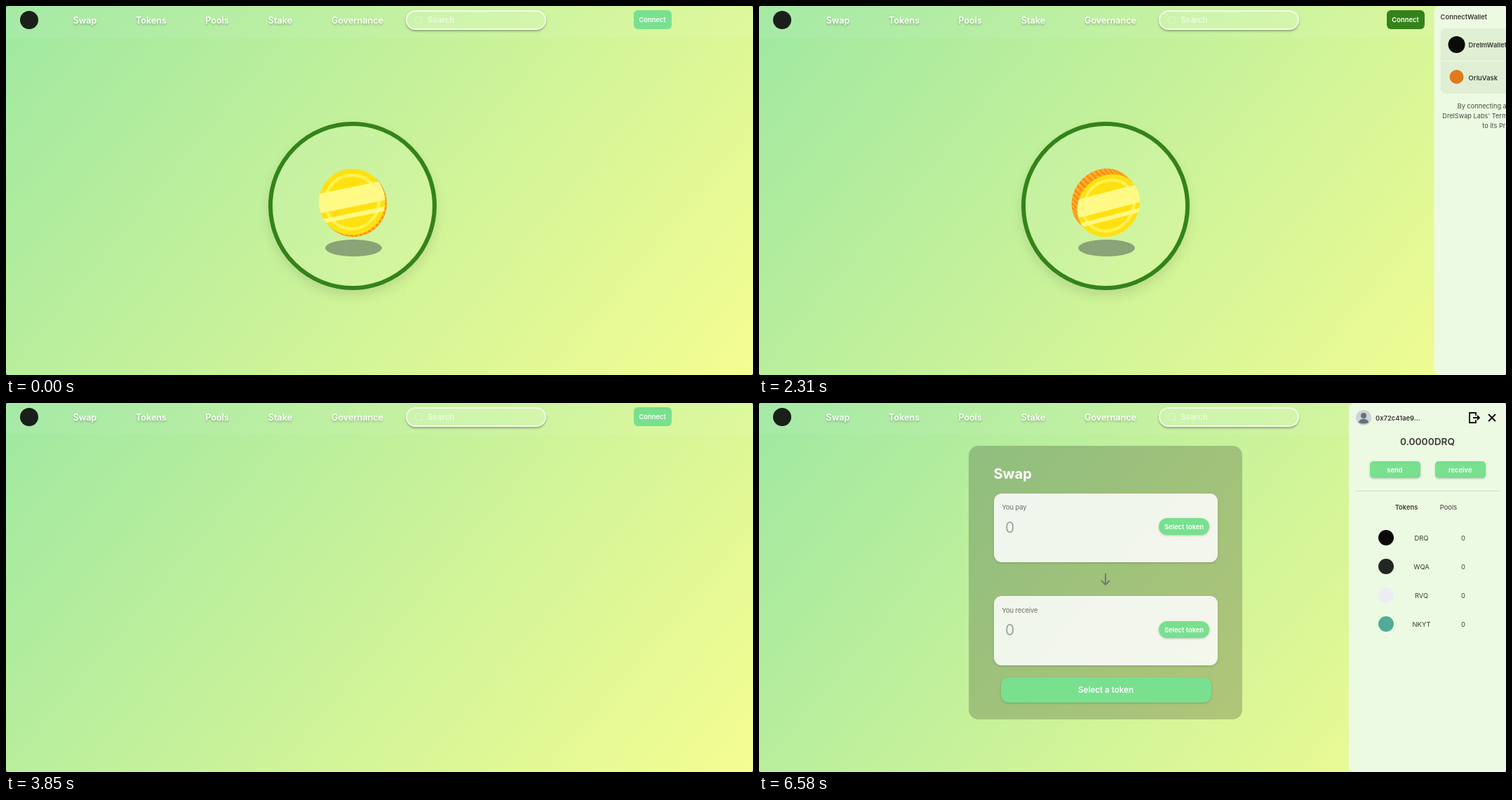
Write an HTML page with a canvas that moves like this. It is 1065x526 px and loops after 8 s.

```html
<!DOCTYPE html>
<html lang="en">
<head>
<meta charset="utf-8">
<title>Token swap</title>
<style>
  html, body { margin: 0; width: 100%; height: 100%; overflow: hidden; background: #5b6350; }
  #stage {
    position: relative; width: 1065px; height: 526px; overflow: hidden; border-radius: 3px;
    background: linear-gradient(130deg, #9fe8a1, #f5fd92);
    font-family: Inter, sans-serif;
  }
  #stage div, #stage span, #stage svg, canvas { position: absolute; box-sizing: border-box; }
  .layer { inset: 0; }
  span { white-space: pre; transform: translateY(-50%); color: #383b36; font-size: 9.4px; }
  span.mid { transform: translate(-50%, -50%); }
  .bold { font-weight: 600; }
  .white { color: #fff; }
  .nav { color: #fff; font-weight: 600; font-size: 12.6px; text-shadow: 0 2px 3px rgba(0,0,0,.25); }
  .terms { font-size: 9.2px; color: #474a44; }
  .green { background: #78e08f; }
  .hover { background: #34831a; }
  .raised { box-shadow: 0 1px 3px rgba(0,0,0,.2); }
  .panel { left: 841px; top: 0; width: 224px; height: 526px; background: #edfae3; border-radius: 8px 0 0 8px; }
  .row { background: #e0efd4; }
  .row.over { background: #d8e5c8; }
  #search { border: 2px solid #f4fce9; background: rgba(255,255,255,.12); box-shadow: 0 2px 3px rgba(0,0,0,.3); }
  #ring { border: 6px solid #34831a; background: rgba(255,255,255,.06); box-shadow: 0 8px 16px rgba(0,0,0,.1); }
</style>
</head>
<body>
<div id="stage"></div>
<script>
const LOOP = 8000, STEP = 70, SLIDE = 350, PANEL_W = 224;
const ACCOUNT = '0x72c41ae9...';

const box = (x, y, w, h, radius, cls = '', css = '', id = '') =>
  `<div id="${id}" class="${cls}" style="left:${x}px;top:${y}px;width:${w}px;height:${h}px;border-radius:${radius}px;${css}"></div>`;
const disc = (cx, cy, r, color) => box(cx - r, cy - r, 2 * r, 2 * r, r, '', `background:${color}`);
const label = (x, y, text, cls = '', css = '') =>
  `<span class="${cls}" style="left:${x}px;top:${y}px;${css}">${text}</span>`;
const button = (x, y, w, h, radius, text, cls = '', css = '', id = '') =>
  box(x, y, w, h, radius, 'green ' + cls, '', id) + label(x + w / 2, y + h / 2, text, 'mid bold white', css);
const icon = (x, y, w, h, viewBox, body) =>
  `<svg style="left:${x}px;top:${y}px" width="${w}" height="${h}" viewBox="${viewBox}" fill="none">${body}</svg>`;
const layer = (id, html, cls = 'layer') => `<div id="${id}" class="${cls}">${html}</div>`;

const avatar = (cx, cy, r) => icon(cx - r, cy - r, 2 * r, 2 * r, '-11 -11 22 22',
  `<circle r="11" fill="#cbd4d8"/><g fill="#63737c"><circle cy="-3" r="4"/>
   <path d="M-7 7C-7 0 7 0 7 7Q0 10-7 7"/></g>`);
const logout = (cx, cy) => icon(cx - 8, cy - 8, 16, 16, '-8 -8 16 16',
  `<path d="M2-3V-7H-7V7H2V3M-2 0H7M4-3L7 0L4 3" stroke="#111" stroke-width="1.8"/>`);
const cross = (cx, cy, r, width) => icon(cx - 8, cy - 8, 16, 16, '-8 -8 16 16',
  `<path d="M${-r} ${-r}L${r} ${r}M${r} ${-r}L${-r} ${r}" stroke="#111" stroke-width="${width}"/>`);

const header = box(0, 0, 1065, 45, 0, '', 'background:rgba(255,255,255,.06)') +
  disc(33, 20, 13, '#1b1f19') +
  [['Swap', 112.5], ['Tokens', 207], ['Pools', 301], ['Stake', 391], ['Governance', 501]]
    .map(([name, x]) => label(x, 20, name, 'mid nav')).join('') +
  box(570, 6, 199.5, 28, 14, '', '', 'search') +
  icon(581, 13, 14, 14, '-7 -7 14 14',
    '<path d="M5 0A5 5 0 1 1 5-.1M3.5 3.5L6 6" stroke="#fff" stroke-opacity=".45"/>') +
  label(601, 20, 'Search', 'bold', 'font-size:11.3px;color:rgba(255,255,255,.62)');

const loader = box(374, 165, 240, 240, 120, '', '', 'ring') +
  box(455, 333.3, 81, 24, '50', '', 'background:#8aa377;border-radius:50%') +
  '<canvas id="coin" width="120" height="120" style="left:434px;top:220px"></canvas>';

const amountBox = (y, title) =>
  box(334.5, y, 319, 98.5, 11, 'raised', 'background:rgba(255,255,255,.86)') +
  label(346.5, y + 19.5, title, '', 'font-size:9.2px;color:#666a63') +
  label(351, y + 48, '0', '', 'font-size:21px;color:#a0a39d') +
  button(570, y + 35.5, 72, 24, 12, 'Select token', 'raised');

const swapCard = box(299, 60.5, 390, 390.5, 14, '', 'background:rgba(0,0,0,.2)') +
  label(334.5, 101, 'Swap', 'white', 'font-size:20px;font-weight:700') +
  amountBox(128.5, 'You pay') +
  icon(486, 242, 16, 18, '-8 -9 16 18',
    '<path d="M0-8V7.5M-6 2L0 8L6 2" stroke="#747a6f" stroke-width="2"/>') +
  amountBox(275, 'You receive') +
  button(344.5, 390.5, 300, 36, 11, 'Select a token', 'raised', 'font-size:11.6px');

const walletPanel = label(9, 14.5, 'ConnectWallet', 'bold') +
  logout(186.5, 14.5) + cross(207.5, 14.5, 6.5, 2.4) +
  box(9, 32, 206, 45.5, '8px 8px 0 0', 'row', 'border-radius:8px 8px 0 0', 'firstWallet') +
  box(9, 79, 206, 45.5, 0, 'row', 'border-radius:0 0 8px 8px', 'secondWallet') +
  disc(32, 54.5, 12, '#0a0a08') + disc(32, 101, 10, '#e07a1e') +
  label(49, 55, 'DrelmWallet', 'bold') + label(49, 101.5, 'OrluVask', 'bold') +
  ['By connecting a wallet, you agree to', 'DrelSwap Labs\' Terms of Service and consent', 'to its Privacy Policy.']
    .map((line, i) => label(112, 141.5 + 14.3 * i, line, 'mid terms')).join('');

const holdings = [['DRQ', '#0a0a08'], ['WQA', '#242622'], ['RVQ', '#ecedf2'], ['NKYT', '#50ac97']];
const accountPanel = avatar(21, 21, 11) + label(38, 21, ACCOUNT, 'bold') +
  logout(178.5, 21) + cross(203.5, 21, 5, 2) +
  label(112, 55, '0.0000DRQ', 'mid bold', 'font-size:13.7px') +
  button(29.5, 82.5, 72, 24, 5, 'send', 'raised') +
  button(122.5, 82.5, 72.5, 24, 5, 'receive', 'raised') +
  box(10, 125, 205, 1, 0, '', 'background:#cbd8c3') +
  label(82, 148, 'Tokens', 'mid bold') + label(142, 148, 'Pools', 'mid') +
  holdings.map(([name, color], i) => {
    const y = 192 + 41 * i;
    return disc(52.5, y, 11, color) + label(103.5, y, name, 'mid') + label(163, y, '0', 'mid');
  }).join('');

document.getElementById('stage').innerHTML = header +
  layer('loader', loader) + layer('swap', swapCard) +
  layer('connect', button(894.5, 6, 54, 26.5, 6, 'Connect', '', '', 'connectButton')) +
  layer('account', box(853.5, 6, 103, 26.5, 6, 'green', '', 'accountButton') +
    avatar(868, 19.3, 7.7) + label(880, 19.5, ACCOUNT, 'bold white')) +
  layer('walletPanel', walletPanel, 'panel') + layer('accountPanel', accountPanel, 'panel');

const el = id => document.getElementById(id);
const show = (id, on) => { el(id).style.display = on ? '' : 'none'; };
const toggle = (id, cls, on) => el(id).classList.toggle(cls, on);
const ctx = el('coin').getContext('2d');

// A half turn looks the same as none, so the angle is folded into -90..90 degrees.
function coinAngle(t) {
  const p = t % 1050 / 1050, w = 2 * Math.PI * p;
  const deg = -8 + 180 * p + 4.7 * Math.sin(w) - 6.5 * (1 - Math.cos(w));
  return (deg > 90 ? deg - 180 : deg) * Math.PI / 180;
}

function drawCoin(angle) {
  const R = 47.5, squash = Math.cos(angle), shift = 12 * Math.sin(angle);
  const side = shift > 0 ? -1 : 1, stripes = 44;
  ctx.setTransform(1, 0, 0, 1, 0, 0);
  ctx.clearRect(0, 0, 120, 120);
  ctx.translate(60.5, 60.5);
  ctx.rotate(-Math.PI / 4);

  // Milled edge, seen on the side away from the face
  ctx.fillStyle = '#ff8a0c';
  ctx.beginPath();
  ctx.ellipse(0, -shift, R, R * squash, 0, 0, 7);
  ctx.fill();
  ctx.fillRect(-R, -Math.abs(shift), 2 * R, 2 * Math.abs(shift));
  const rim = i => {
    const a = Math.PI * i / stripes;
    return [R * Math.cos(a), side * R * squash * Math.sin(a)];
  };
  ctx.fillStyle = '#ffb331';
  for (let i = 0; i < stripes; i += 2) {
    const [x1, y1] = rim(i), [x2, y2] = rim(i + 1);
    ctx.beginPath();
    ctx.moveTo(x1, y1 - shift);
    ctx.lineTo(x2, y2 - shift);
    ctx.lineTo(x2, y2 + shift);
    ctx.lineTo(x1, y1 + shift);
    ctx.fill();
  }

  // Face with ring and two slanted highlights
  ctx.save();
  ctx.translate(0, shift);
  ctx.scale(1, squash);
  ctx.rotate(Math.PI / 4);
  ctx.beginPath();
  ctx.arc(0, 0, R, 0, 7);
  ctx.fillStyle = '#ffe112';
  ctx.fill();
  ctx.clip();
  ctx.beginPath();
  ctx.arc(0, 0, 38.5, 0, 7);
  ctx.lineWidth = 4.5;
  ctx.strokeStyle = '#fff250';
  ctx.stroke();
  ctx.transform(1, -.2, 0, 1, 0, 0);
  ctx.fillStyle = '#fff986';
  ctx.fillRect(-50, -21.5, 100, 28.5);
  ctx.fillRect(-50, 16, 100, 6.5);
  ctx.restore();
}

function slide(id, t, start, end) {
  const p = Math.min(1, Math.max(0, (t - start) / SLIDE));
  show(id, p > 0 && t < end);
  el(id).style.transform = `translateX(${PANEL_W * (1 - p * p * (3 - 2 * p))}px)`;
}

function render(time) {
  const t = Math.floor(time / STEP) * STEP;
  show('loader', t < 3850);
  show('swap', t >= 3920);
  show('connect', t < 3990);
  show('account', t >= 3990);
  toggle('connectButton', 'hover', t >= 1960 && t < 3850);
  toggle('accountButton', 'hover', t >= 6090);
  toggle('firstWallet', 'over', t >= 2870 && t < 3150);
  toggle('secondWallet', 'over', t >= 3150);
  slide('walletPanel', t, 2145, 3850);
  slide('accountPanel', t, 6205, LOOP);
  if (t < 3850) drawCoin(coinAngle(Math.min(t, 3710)));
}

const start = performance.now();
function tick() {
  render((performance.now() - start) % LOOP);
  requestAnimationFrame(tick);
}
tick();
</script>
</body>
</html>
```
